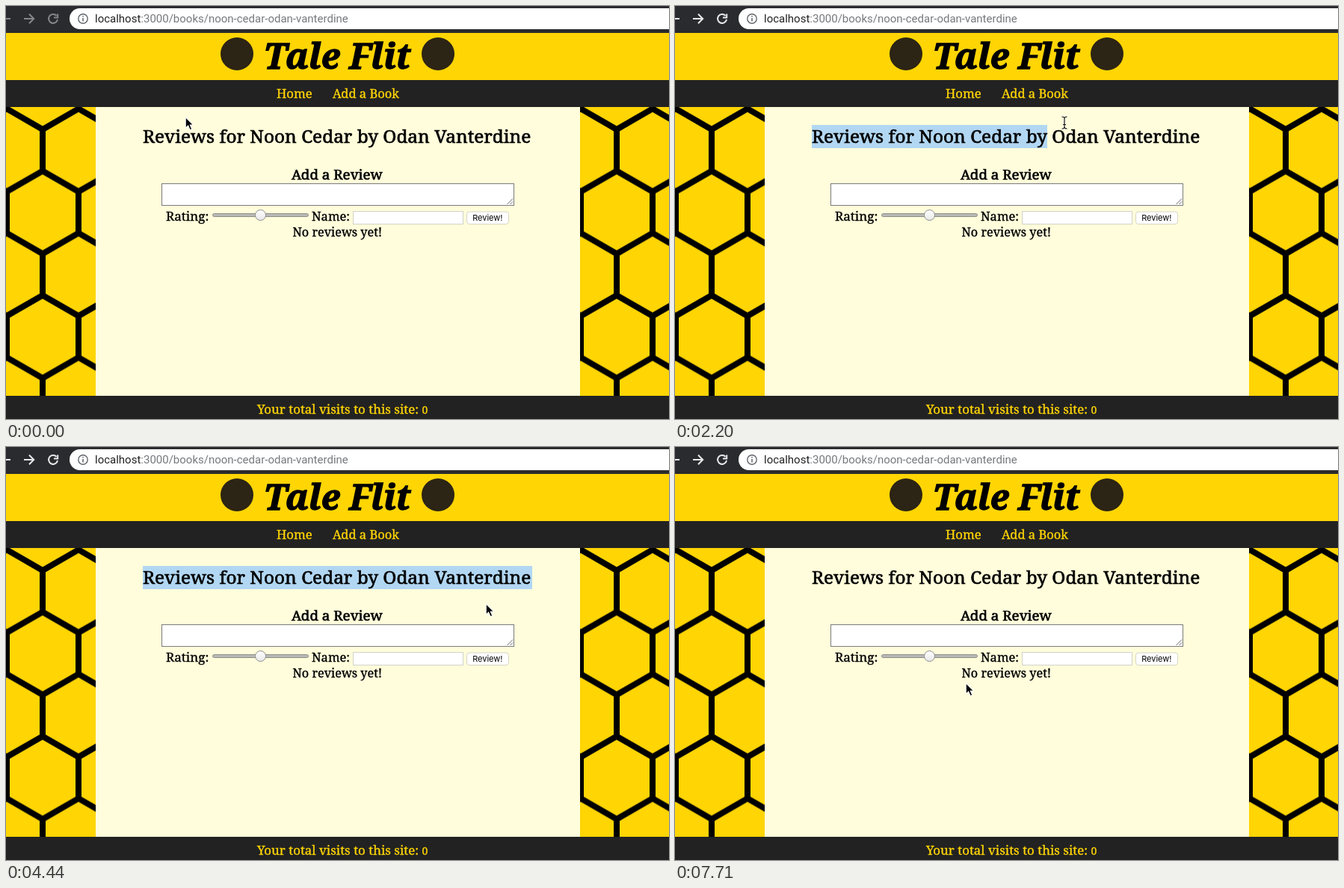
Write an HTML page that moves like this. It is 887x552 px and loops after 8000 ms.

```html
<!DOCTYPE html>
<html lang="en">
<head>
<meta charset="utf-8">
<title>Book reviews</title>
<style>
  html, body { margin: 0; width: 100%; height: 100%; overflow: hidden; background: #222; }
  svg { display: block; width: 887px; height: 552px; }
  text { font-family: "Noto Serif", serif; font-size: 16.5px; white-space: pre; }
  .url { font-family: Roboto, sans-serif; font-size: 15px; fill: #76797d; }
  .host { fill: #222; }
  .logo { font-size: 47px; font-weight: 700; font-style: italic; text-anchor: middle; stroke: #000; stroke-width: 1.4; }
  .gold { fill: #ffd504; stroke: #ffd504; stroke-width: .35; }
  .body { stroke: #000; stroke-width: .35; }
  .bold { stroke: #000; stroke-width: .65; }
  .button { font-family: Inter, sans-serif; font-size: 11px; text-anchor: middle; }
  .sel { fill: #b2d7f3; }
  #icons { fill: none; stroke: #85868a; stroke-width: 2; }
  #icons.on { stroke: #e8e9eb; }
</style>
</head>
<body>
<svg viewBox="0 0 887 552">
  <defs>
    <pattern id="comb" x="1" y="165" width="96" height="166.2" patternUnits="userSpaceOnUse">
      <rect width="96" height="166.2" fill="#ffd504"/>
      <path d="M48 0V55.4L0 83.1V138.5L48 166.2L96 138.5V83.1L48 55.4M0 -27.7L48 0L96 -27.7M48 166.2V180"
        fill="none" stroke="#000" stroke-width="8"/>
    </pattern>
    <linearGradient id="knob" x2="0" y2="1">
      <stop stop-color="#fff"/><stop offset="1" stop-color="#e9e9e9"/>
    </linearGradient>
    <path id="caret" d="M-3.5 -8Q0 -8 0 -5.5Q0 -8 3.5 -8M0 -6V6M-3.5 8Q0 8 0 5.5Q0 8 3.5 8M-2 2.5H2"/>
  </defs>

  <!-- browser bar -->
  <rect width="887" height="36" fill="#2a2b2e"/>
  <g id="icons">
    <path d="M-6 17H6M24 17H37M31 10.8L37.2 17L31 23.2"/>
    <path d="M67.6 13A6 6 0 1 0 69 18"/>
    <path d="M69.2 10.5V15.6H64"/>
  </g>
  <rect x="85" y="3" width="830" height="28" rx="14" fill="#fff"/>
  <circle cx="103" cy="17" r="6.2" fill="none" stroke="#5f6368" stroke-width="1.4"/>
  <path d="M103 16V20.5M103 13V14.6" stroke="#5f6368" stroke-width="1.5"/>
  <text class="url" x="119" y="22"><tspan class="host">localhost</tspan>:3000/books/noon-cedar-odan-vanterdine</text>

  <!-- site header -->
  <rect y="36" width="887" height="63" fill="#ffd504"/>
  <circle cx="309" cy="64" r="22" fill="#2c2414"/>
  <circle cx="578" cy="64" r="22" fill="#2c2414"/>
  <text class="logo" x="443" y="84">Tale Flit</text>
  <rect y="99" width="887" height="36" fill="#222"/>
  <text class="gold" x="362" y="123" style="font-size:16.8px">Home</text>
  <text class="gold" x="437" y="123">Add a Book</text>

  <!-- page -->
  <rect y="135" width="887" height="386" fill="url(#comb)"/>
  <rect x="120" y="135" width="648" height="386" fill="#fffddb"/>
  <rect class="sel" id="selTitle" y="159" height="31"/>
  <rect class="sel" id="selNote" y="292" height="20"/>
  <text class="bold" x="183" y="183" style="font-size:24.4px">Reviews for Noon Cedar by Odan Vanterdine</text>
  <text class="bold" x="382" y="232" style="font-size:18.8px">Add a Review</text>
  <rect x="208.5" y="237.5" width="471" height="29" fill="#fff" stroke="#7b7b7b"/>
  <path d="M670.5 265L678 257.5M674.5 265L678 261.5" stroke="#666"/>
  <text class="body" x="214" y="287" style="font-size:17.1px">Rating:</text>
  <rect x="276.5" y="277.5" width="128" height="4" rx="2" fill="#b9b9b5" stroke="#8f8f8b"/>
  <circle cx="340.5" cy="279.5" r="7" fill="url(#knob)" stroke="#8c8c8c"/>
  <text class="body" x="409" y="287">Name:</text>
  <rect x="464.5" y="274.5" width="147" height="17" fill="#fff" stroke="#d2d2c8"/>
  <rect x="616.5" y="275" width="56" height="16.5" rx="3.5" fill="#fff" stroke="#d6d5c4"/>
  <text class="button" x="644.3" y="287">Review!</text>
  <text class="body" x="383.5" y="308" style="font-size:16.2px">No reviews yet!</text>

  <rect y="521" width="887" height="31" fill="#222"/>
  <text class="gold" x="336" y="545" style="font-size:16.9px">Your total visits to this site: <tspan font-size="14" style="font-size:14px">0</tspan></text>

  <!-- pointers -->
  <path id="arrow" d="M-.8 -.5V14.1L2.6 11L5.2 16.7L7.8 15.5L5.3 10H9.8Z" fill="#000" stroke="#fff" stroke-width="1.1"/>
  <g id="beam" fill="none">
    <use href="#caret" stroke="#fff" stroke-opacity=".6" stroke-width="2.4"/>
    <use href="#caret" stroke="#111" stroke-width="1.2"/>
  </g>
</svg>
<script>
  const LOOP = 8000, TITLE_LEFT = 183, NOTE_RIGHT = 504;
  const $ = id => document.getElementById(id);

  // time, pointer, x, y
  const moves = [
    [0, 'arrow', 241, 149], [300, 'arrow', 239, 150], [450, 'arrow', 233, 152],
    [590, 'arrow', 225, 155], [740, 'arrow', 215, 159], [880, 'beam', 206, 168],
    [1020, 'beam', 200, 171], [1170, 'beam', 195, 172], [1310, 'beam', 191, 173],
    [1450, 'beam', 184, 173], [1750, 'beam', 203, 173], [1900, 'beam', 262, 168],
    [2050, 'beam', 390, 159], [2200, 'beam', 521, 156], [2500, 'beam', 600, 170],
    [2640, 'beam', 638, 175], [2790, 'beam', 668, 178], [2940, 'beam', 684, 179],
    [3090, 'beam', 692, 179], [3240, 'beam', 695, 179], [3390, 'beam', 696, 179],
    [4140, 'arrow', 680, 190], [4290, 'arrow', 655, 204], [4440, 'arrow', 643, 210],
    [5480, 'beam', 518, 290], [5620, 'beam', 513, 300], [5770, 'beam', 510, 307],
    [5920, 'beam', 508, 312], [6070, 'beam', 500, 311], [6210, 'beam', 466, 306],
    [6360, 'beam', 425, 304], [6510, 'beam', 404, 307], [6660, 'beam', 386, 312],
    [6810, 'beam', 379, 316], [7260, 'arrow', 384, 315], [7410, 'arrow', 390, 316]
  ];

  // time, moving edge of the selection
  const titleSteps = [[0, 183], [1900, 225], [2050, 318], [2200, 498], [2500, 580],
    [2640, 616], [2790, 668], [2940, 704], [4730, 183]];
  const noteSteps = [[0, 504], [6210, 493], [6360, 462], [6510, 412], [6660, 384], [7710, 504]];

  const at = (steps, t) => steps.findLast(s => s[0] <= t);

  function select(id, from, to) {
    $(id).setAttribute('x', from);
    $(id).setAttribute('width', to - from);
  }

  function draw(now) {
    const t = now % LOOP;
    const [, kind, x, y] = at(moves, t);
    for (const id of ['arrow', 'beam']) {
      $(id).setAttribute('visibility', id === kind ? 'visible' : 'hidden');
      $(id).setAttribute('transform', `translate(${x} ${y})`);
    }
    $('icons').classList.toggle('on', t >= 300);
    select('selTitle', TITLE_LEFT, at(titleSteps, t)[1]);
    select('selNote', at(noteSteps, t)[1], NOTE_RIGHT);
  }

  const start = performance.now();
  function tick() {
    draw(performance.now() - start);
    requestAnimationFrame(tick);
  }
  tick();
</script>
</body>
</html>
```
